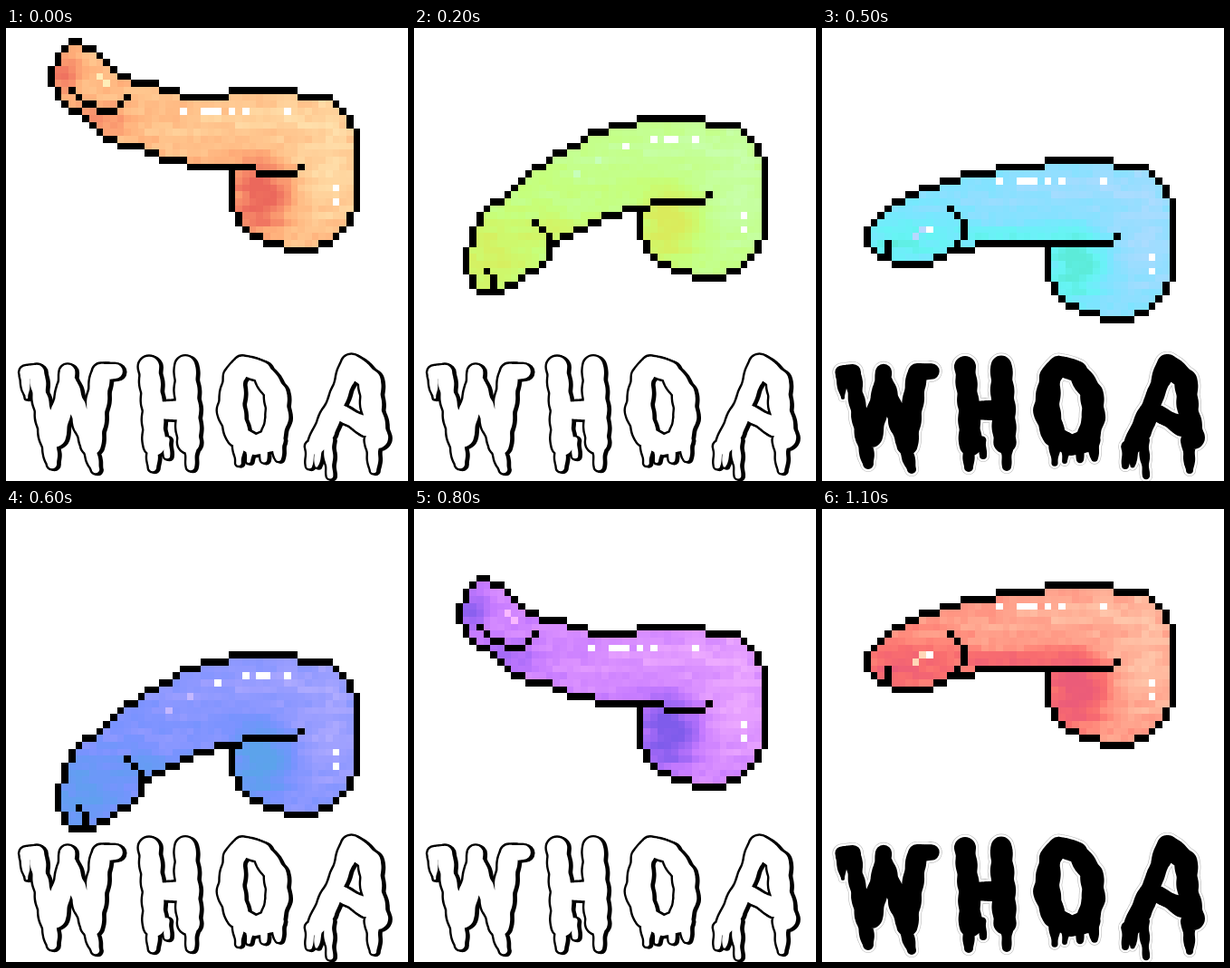
Recreate the animation shown at these times as an HTML page with a canvas. Size 444 by 500 pixels, loop 1.2 s.

```html
<!DOCTYPE html>
<html lang="en">
<head>
<meta charset="utf-8">
<title>Whoa</title>
<style>
html, body { margin: 0; width: 444px; height: 500px; overflow: hidden; background: #fff; }
canvas { display: block; }
</style>
</head>
<body>
<canvas id="stage" width="444" height="500" role="img" aria-label="WHOA"></canvas>
<script>
const ctx = document.getElementById('stage').getContext('2d');
const STEP = 100, STEPS = 12;
const CELL = 7.675, X0 = 46, Y0 = 11.4;
const COLS = 45, ROWS = 33;

const mix = (a, b, f) => a.map((v, i) => v + (b[i] - v) * f);
const points = text => text.split(' ').map(p => p.split(',').map(Number));

// Cells on the straight lines between key points; ";" lifts the pen
function trace(text) {
  const cells = [];
  for (const part of text.split(';')) {
    const pts = points(part.trim());
    cells.push(pts[0]);
    for (let i = 1; i < pts.length; i++) {
      const [a, b] = [pts[i - 1], pts[i]];
      const n = Math.max(Math.abs(b[0] - a[0]), Math.abs(b[1] - a[1]));
      for (let k = 1; k <= n; k++) cells.push(mix(a, b, k / n).map(v => Math.round(v)));
    }
  }
  return cells;
}

const BASE = '26,7 35,7 36,8 40,8 43,11 43,12 44,13 44,24 43,25 43,26 41,28 38,30 34,30 33,29 29,28 27,26 27,25 26,24 26,20;';

// Blobs of shade: column, row, width, height, strength
const BASE_SHADE = [[30, 21, 4, 4, -.55], [30, 25, 4, 4, -.3], [40, 18, 5, 9, .28], [30, 11, 11, 3, .25]];

function makePose(outline, shade, shine, glow) {
  const line = trace(BASE + outline);
  const blobs = BASE_SHADE.concat(shade);
  const cells = inside(line).map(([c, r]) => [c, r, tone(c, r, blobs)]);
  return { line, cells, shine: trace(shine), glow: trace(glow) };
}

// Cells within the closed line, found by flooding from the corner
function inside(line) {
  const seen = new Set(line.map(String)), stack = [[-1, -1]], cells = [];
  while (stack.length) {
    const [x, y] = stack.pop(), key = x + ',' + y;
    if (x < -1 || y < -1 || x > COLS || y > ROWS || seen.has(key)) continue;
    seen.add(key);
    stack.push([x + 1, y], [x - 1, y], [x, y + 1], [x, y - 1]);
  }
  for (let r = 0; r < ROWS; r++)
    for (let c = 0; c < COLS; c++)
      if (!seen.has(c + ',' + r)) cells.push([c, r]);
  return cells;
}

function noise(a, b) {
  const n = Math.sin(a * 127.1 + b * 311.7) * 43758.5453;
  return n - Math.floor(n) - .5;
}

// Short level streaks over soft blobs, 0 dark to 1 light
function tone(c, r, blobs) {
  let v = .6 + .22 * noise(Math.floor((c + r % 3) / 3), r) + .1 * noise(c, r + 50);
  for (const [x, y, rx, ry, k] of blobs)
    v += k * Math.exp(-(((c - x) / rx) ** 2) - ((r - y) / ry) ** 2);
  return Math.min(1, Math.max(0, v));
}

const SHINE = '19,10; 22,10 24,10; 26,10; 28,10; 34,10; 41,21; 41,23';
const up = makePose(
  '25,8 19,8 18,7 14,6 10,5 6,1 3,0 1,2 0,4 0,6 1,8 3,10 4,10 7,13 8,14 15,16 16,17 19,17 20,18 29,18 30,19 35,19 36,18;' +
  '26,18 26,20; 3,7 5,9 6,9 7,10 9,10 11,8',
  [[2, 5, 2, 3, -.5], [7, 11, 4, 2, -.4]], SHINE, '7,5 8,6');
const level = makePose(
  '25,8 19,8 18,9 14,9 13,10 8,11 4,13 0,17 0,19 2,21 3,21 4,22 9,22 12,20 15,20 16,19 35,19 36,18;' +
  '3,19 3,20; 12,14 14,16 14,18 13,19',
  [[5, 19, 6, 4, -.45], [20, 18, 9, 1.6, -.4]], SHINE + '; 9,17', '8,17; 7,18');
const down = makePose(
  '25,8 22,8 21,9 19,9 18,10 13,13 11,14 6,19 5,19 3,21 3,22 2,23 2,25 1,26 1,29 2,31 3,32 6,32 9,30 12,28 13,27 13,24 11,22;' +
  '14,25 15,24 21,21 23,21 24,20 27,20 28,19 35,19 36,18; 4,29 5,30 5,31',
  [[5, 27, 6, 6, -.45], [14, 23, 5, 2, -.35]], '24,11; 28,10; 30,10 31,10; 34,10; 41,21; 41,23', '20,13; 17,15');

// Shadow, middle and light tones as hue, saturation, lightness
const TONES = [[5, 78, 64], [24, 100, 74], [38, 100, 84]];
const HUES = [0, 62, 130, 205, 250, 325, 360];

function hueAt(n) {
  const i = Math.floor(n / 2);
  return HUES[i] + (HUES[i + 1] - HUES[i]) * (n / 2 - i);
}

function colour(v, shift) {
  const i = v < .5 ? 0 : 1;
  const [h, s, l] = mix(TONES[i], TONES[i + 1], v * 2 - i);
  return `hsl(${h + shift}, ${s}%, ${l}%)`;
}

function drawBody(pose, lift, shift) {
  const edgeX = c => Math.round(X0 + c * CELL);
  const edgeY = r => Math.round(Y0 + (r + lift) * CELL);
  const cell = (c, r, fill) => {
    ctx.fillStyle = fill;
    ctx.fillRect(edgeX(c), edgeY(r), edgeX(c + 1) - edgeX(c), edgeY(r + 1) - edgeY(r));
  };
  for (const [c, r, v] of pose.cells) cell(c, r, colour(v, shift));
  for (const [c, r] of pose.glow) cell(c, r, `hsl(${45 + shift}, 100%, 86%)`);
  for (const [c, r] of pose.shine) cell(c, r, '#fff');
  for (const [c, r] of pose.line) cell(c, r, '#000');
}

// Fat brush strokes (x, y, radius), ending in drips
const LETTERS = [
  '22,380,8 34,380,10 37,405,9 46,445,11 51,481,7; 21,384,7 23,408,3; 68,380,9 66,402,11 54,450,13; 70,390,9 84,435,11 99,487,6; 121,379,9 105,380,11 102,402,12 94,460,12',
  '158,374,12 162,420,12 164,460,13; 162,465,7 162,485,6; 177,455,5 178,472,4; 198,373,12 200,420,14 202,457,13; 204,460,8 204,484,5; 165,422,11 198,422,11',
  '261,372,11 282,379,12 298,403,13 300,430,13 293,455,13 275,461,11 256,450,13 248,422,15 252,385,12 261,372,11; 257,460,7 257,480,4; 270,462,7 268,478,3; 285,460,7 285,476,4; 299,455,9 301,475,4',
  '381,371,12 367,408,10 352,445,13 342,462,10; 337,462,7 335,483,4; 345,465,6 343,483,3; 355,455,7 358,494,4; 382,371,12 402,389,13 404,420,12 410,452,13; 405,455,9 406,488,5; 367,423,9 398,440,11'
];

const discs = [];
for (const stroke of LETTERS.join(';').split(';')) {
  const pts = points(stroke.trim());
  for (let i = 1; i < pts.length; i++) {
    const n = Math.ceil(Math.hypot(pts[i][0] - pts[i - 1][0], pts[i][1] - pts[i - 1][1]));
    for (let k = 0; k <= n; k++) {
      const [x, y, r] = mix(pts[i - 1], pts[i], k / n);
      discs.push([x, y, r + .6 * Math.sin(y * .3 + x * .1)]);
    }
  }
}

function paint(fill, grow, dx = 0, dy = 0) {
  ctx.fillStyle = fill;
  ctx.beginPath();
  for (const [x, y, r] of discs) {
    ctx.moveTo(x + dx + r + grow, y + dy);
    ctx.arc(x + dx, y + dy, r + grow, 0, 7);
  }
  ctx.fill();
}

function drawWord(solid) {
  if (solid) {
    paint('#bbb', 2.6);
    paint('#fff', 2);
    paint('#000', -.4);
  } else {
    paint('#000', 1, 2.5, .8);
    paint('#000', 1.2);
    paint('#fff', -1.2);
  }
}

let last = -1;
function tick() {
  const n = Math.floor(performance.now() / STEP) % STEPS;
  if (n !== last) {
    last = n;
    ctx.fillStyle = '#fff';
    ctx.fillRect(0, 0, 444, 500);
    drawBody([up, level, down, level][n % 4], 2 * Math.min(n, STEPS - n), hueAt(n));
    drawWord(n % 2 === 1);
  }
  requestAnimationFrame(tick);
}
tick();
</script>
</body>
</html>
```
